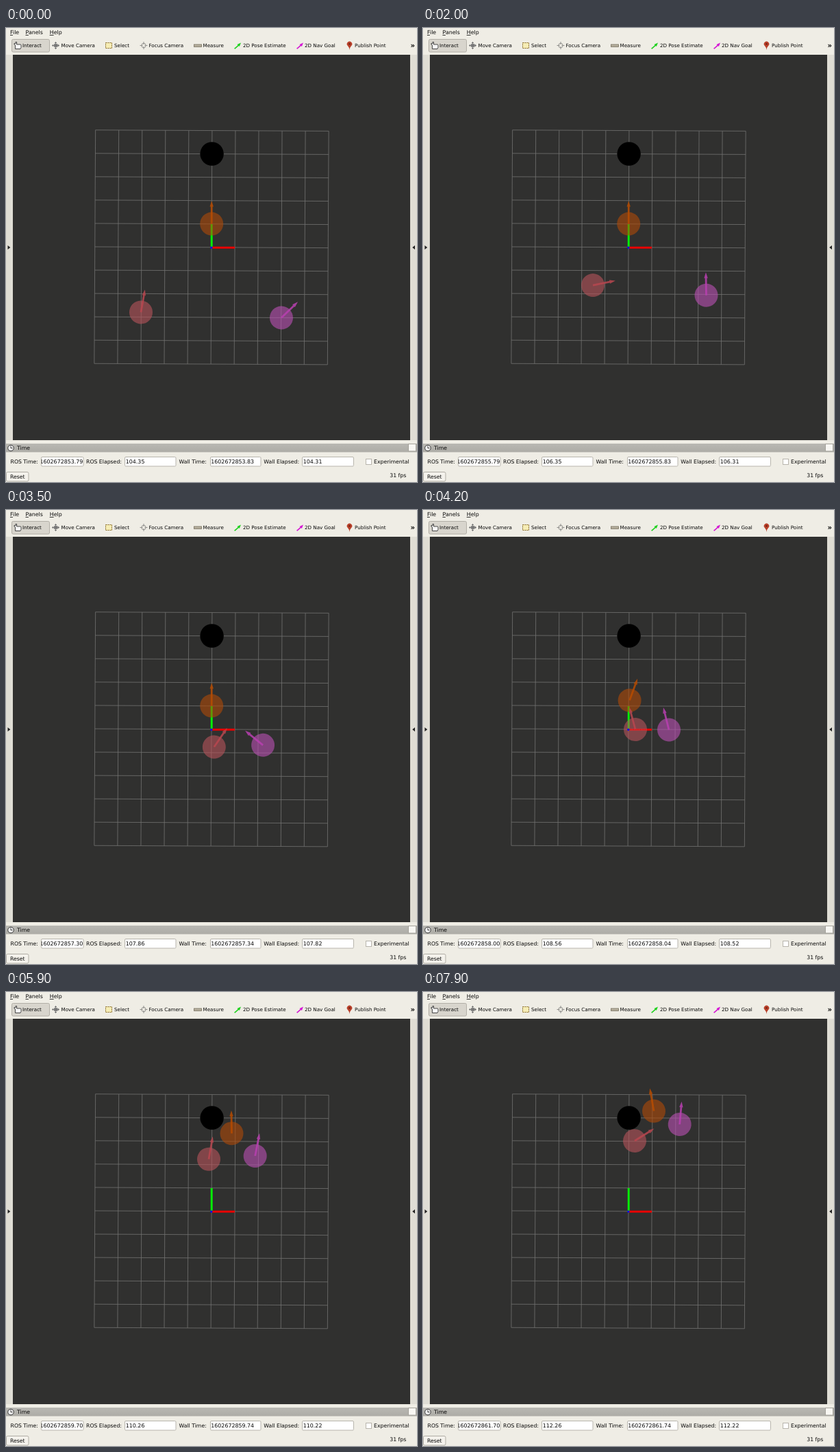
An HTML page for the animation above (8 s loop, 600 by 662 pixels).

```html
<!DOCTYPE html>
<html lang="en">
<head>
<meta charset="utf-8">
<title>Robot formation view</title>
<style>
  html, body { margin: 0; width: 100%; height: 100%; overflow: hidden; background: #efede5; }
  svg { display: block; width: 600px; height: 662px; }
  text { font: 7.75px "DejaVu Sans", sans-serif; fill: #080808; white-space: pre; }
  .menu text { font-size: 7.9px; }
  .tools text { font-size: 7.15px; }
  .tools .more { font-size: 10px; font-weight: bold; }
  .field rect { fill: #fff; stroke: #b8b5ad; }
  .value { font-size: 7.9px; }
  .grid { stroke: #737371; stroke-width: .8; fill: none; }
  .key { text-decoration: underline; }
</style>
</head>
<body>
<svg viewBox="0 0 600 662">
  <defs>
    <linearGradient id="dockTitle" x2="0" y2="1">
      <stop offset="0" stop-color="#b9b8b3"/><stop offset="1" stop-color="#adaca6"/>
    </linearGradient>
    <clipPath id="rosClip"><rect x="51.5" y="625" width="61" height="14"/></clipPath>
    <path id="toolArrow" d="M333 29.7l5.500-4.700-1-1 5.500-2.500-2.200 5.500-1-1-5.500 4.700z"/>
  </defs>
  <rect width="600" height="662" fill="#efede5"/>

  <g class="menu">
    <text x="6" y="9"><tspan class="key">F</tspan>ile</text>
    <text x="28.5" y="9"><tspan class="key">P</tspan>anels</text>
    <text x="63.7" y="9"><tspan class="key">H</tspan>elp</text>
  </g>

  <g class="tools">
    <rect x="8.5" y="16.5" width="55" height="18.5" rx="2" fill="#d8d5cd" stroke="#b2afa7"/>
    <path d="M13.5 30.5V25l-1.5-1v-1.5l2 .5V20.5h1.6V24h5.4q1 0 1 1.2v3.3l-1 2z" fill="#fafafa" stroke="#333" stroke-width=".9"/>
    <g fill="none" stroke="#777">
      <path d="M72.5 20.5v10M67.5 25.5h10M71 22l1.5-1.5L74 22M71 29l1.5 1.5L74 29M69 24l-1.5 1.5L69 27M76 24l1.5 1.5L76 27"/>
      <rect x="70.5" y="23.8" width="4.5" height="3.4" fill="#777"/>
    </g>
    <g fill="none" stroke="#8a8a86" stroke-width=".9">
      <circle cx="201" cy="25.5" r="3.2"/>
      <path d="M201 20v4M201 27v4M195.5 25.5h4M202.5 25.5h4"/>
    </g>
    <rect x="145.5" y="21.5" width="9" height="8" fill="#f5ecb4" stroke="#8a6d28" stroke-dasharray="2 1"/>
    <rect x="274.5" y="24" width="11" height="3.5" fill="#b5ae9c" stroke="#77705f" stroke-width=".8"/>
    <use href="#toolArrow" fill="#1fd11f"/>
    <use href="#toolArrow" x="91" fill="#d414d4"/>
    <path d="M501.5 32q-.5-4-2.600-6a3.700 3.700 0 1 1 5.200 0q-2.100 2-2.600 6z" fill="#b8402a"/>
    <circle cx="501.5" cy="23.3" r="1.2" fill="#6d2013"/>
    <text x="24" y="28.4">Interact</text>
    <text x="80.5" y="28.4">Move Camera</text>
    <text x="158" y="28.4">Select</text>
    <text x="208.5" y="28.4">Focus Camera</text>
    <text x="287.5" y="28.4">Measure</text>
    <text x="346" y="28.4">2D Pose Estimate</text>
    <text x="436" y="28.4">2D Nav Goal</text>
    <text x="509" y="28.4">Publish Point</text>
    <text class="more" x="590.5" y="29">»</text>
  </g>

  <rect y="39" width="600" height="562" fill="#dfddd5"/>
  <path d="M2.500 317v6l3.800-3zM597 317v6l-3.800-3z" fill="#222"/>
  <rect x="10" y="39" width="580" height="562" fill="#30302f"/>

  <path id="grid" class="grid"/>
  <circle cx="300.6" cy="183.5" r="17.2"/>
  <path d="M300.2 319V286" stroke="#06ee06" stroke-width="3"/>
  <path d="M301 320.200H334" stroke="#e80000" stroke-width="3"/>
  <g id="robots"></g>
  <!-- axes flicker through the translucent discs -->
  <g stroke-width="1.5" stroke-dasharray="1 1.5">
    <path d="M300.2 318V286" stroke="#06ee06" opacity=".4"/>
    <path d="M302 320.200H334" stroke="#e80000"/>
  </g>
  <circle cx="299.8" cy="320.2" r="1.7" fill="#1010e0"/>

  <rect y="606" width="600" height="12.5" fill="url(#dockTitle)"/>
  <circle cx="7" cy="612.5" r="4.3" fill="#eee" stroke="#333"/>
  <path d="M7 609.500v3h2.500" fill="none" stroke="#333" stroke-width=".9"/>
  <text x="16" y="615.3">Time</text>
  <rect x="587.5" y="606.5" width="11" height="10.5" fill="#f8f7f3" stroke="#a5a39c"/>

  <text x="6.5" y="635">ROS Time:</text>
  <text x="117" y="635">ROS Elapsed:</text>
  <text x="252.5" y="635">Wall Time:</text>
  <text x="376.3" y="635">Wall Elapsed:</text>
  <g class="field">
    <rect x="51.5" y="625.5" width="61.5" height="13.5" rx="1.5"/>
    <rect x="173.5" y="625.5" width="74.5" height="13.5" rx="1.5"/>
    <rect x="298.5" y="625.5" width="73.5" height="13.5" rx="1.5"/>
    <rect x="432.5" y="625.5" width="75" height="13.5" rx="1.5"/>
    <rect x="525.5" y="628.5" width="8" height="8"/>
  </g>
  <g clip-path="url(#rosClip)"><text id="rosTime" class="value" x="112.3" y="635" text-anchor="end"></text></g>
  <text id="rosElapsed" class="value" x="174.8" y="635"></text>
  <text id="wallTime" class="value" x="299.3" y="635"></text>
  <text id="wallElapsed" class="value" x="433.8" y="635"></text>
  <text x="537" y="635">Experimental</text>

  <rect x=".5" y="647.5" width="32.5" height="13.5" rx="2" fill="#f4f2ec" stroke="#b0ada5"/>
  <text x="6" y="657.3">Reset</text>
  <text x="560.3" y="655">31 fps</text>
</svg>

<script>
const LOOP = 8000, STEP = 100, CELL = 34.05, RAD = Math.PI / 180;
const $ = id => document.getElementById(id);

// 10 x 10 grid around the axes, seen with a slight skew
const gridPoint = (i, j) => [300 + i * CELL - j * .18, 319.8 + j * CELL + i * .16];
let gridPath = "";
for (let k = -5; k <= 5; k++) {
  gridPath += `M${gridPoint(k, -5)}L${gridPoint(k, 5)}M${gridPoint(-5, k)}L${gridPoint(5, k)}`;
}
$("grid").setAttribute("d", gridPath);

// Way points: time, x, y, heading in degrees. A robot waits at its first one.
const robots = [
  { disc: "#b04a08", arrow: "#b64b00", way: [
    [4000, 300.2, 285.6, 90], [4200, 301.6, 277.6, 70], [5100, 329, 239.8, 72],
    [5900, 329.5, 206.2, 91], [7000, 334, 197, 72], [7900, 337, 173.6, 100]] },
  { disc: "#b8545a", arrow: "#b8474f", way: [
    [400, 197, 414.5, 80], [1200, 213.5, 386, 30], [2700, 278.8, 366.6, 24],
    [4200, 310, 320, 105], [5100, 290, 277.2, 92], [5900, 296, 243.8, 80], [7900, 309, 217, 32]] },
  { disc: "#bb50b4", arrow: "#b83fb0", way: [
    [1200, 402, 422.5, 44], [2700, 402.6, 362.6, 141], [4200, 359, 320.5, 104],
    [5900, 363.7, 239, 79], [7900, 374.7, 193, 85]] }
];

for (const robot of robots) {
  $("robots").insertAdjacentHTML("beforeend",
    `<g><circle r="17" fill="${robot.disc}" opacity=".6"/>
     <path d="M0-1.400H25V-2.700L33.500 0L25 2.700V1.400H0z" fill="${robot.arrow}" opacity=".85"/></g>`);
  robot.node = $("robots").lastElementChild;
}

// Position and velocity on a cubic Hermite curve
function hermite(a, b, va, vb, u) {
  const c = 3 * (b - a) - 2 * va - vb, d = 2 * (a - b) + va + vb;
  return [a + u * (va + u * (c + u * d)), va + u * (2 * c + 3 * u * d)];
}

// Robots drive along their heading, so the curve's tangents give the direction
function poseAt(way, t) {
  const next = Math.max(1, way.findIndex(p => p[0] >= t));
  const [t0, x0, y0, h0] = way[next - 1], [t1, x1, y1, h1] = way[next];
  const u = Math.max(0, (t - t0) / (t1 - t0));
  const len = Math.hypot(x1 - x0, y1 - y0);
  const [x, dx] = hermite(x0, x1, len * Math.cos(h0 * RAD), len * Math.cos(h1 * RAD), u);
  const [y, dy] = hermite(y0, y1, -len * Math.sin(h0 * RAD), -len * Math.sin(h1 * RAD), u);
  return [x, y, Math.atan2(dy, dx) / RAD];
}

const clocks = { rosTime: 1602672853.79, rosElapsed: 104.35, wallTime: 1602672853.83, wallElapsed: 104.31 };

function render(t) {
  for (const { way, node } of robots) {
    const [x, y, turn] = poseAt(way, t);
    node.setAttribute("transform", `translate(${x} ${y}) rotate(${turn})`);
  }
  for (const id in clocks) $(id).textContent = (clocks[id] + t * 1.0015 / 1000).toFixed(2);
}

const start = performance.now();
function tick() {
  const t = (performance.now() - start) % LOOP;
  render(Math.floor(t / STEP) * STEP);
  requestAnimationFrame(tick);
}
tick();
</script>
</body>
</html>
```
